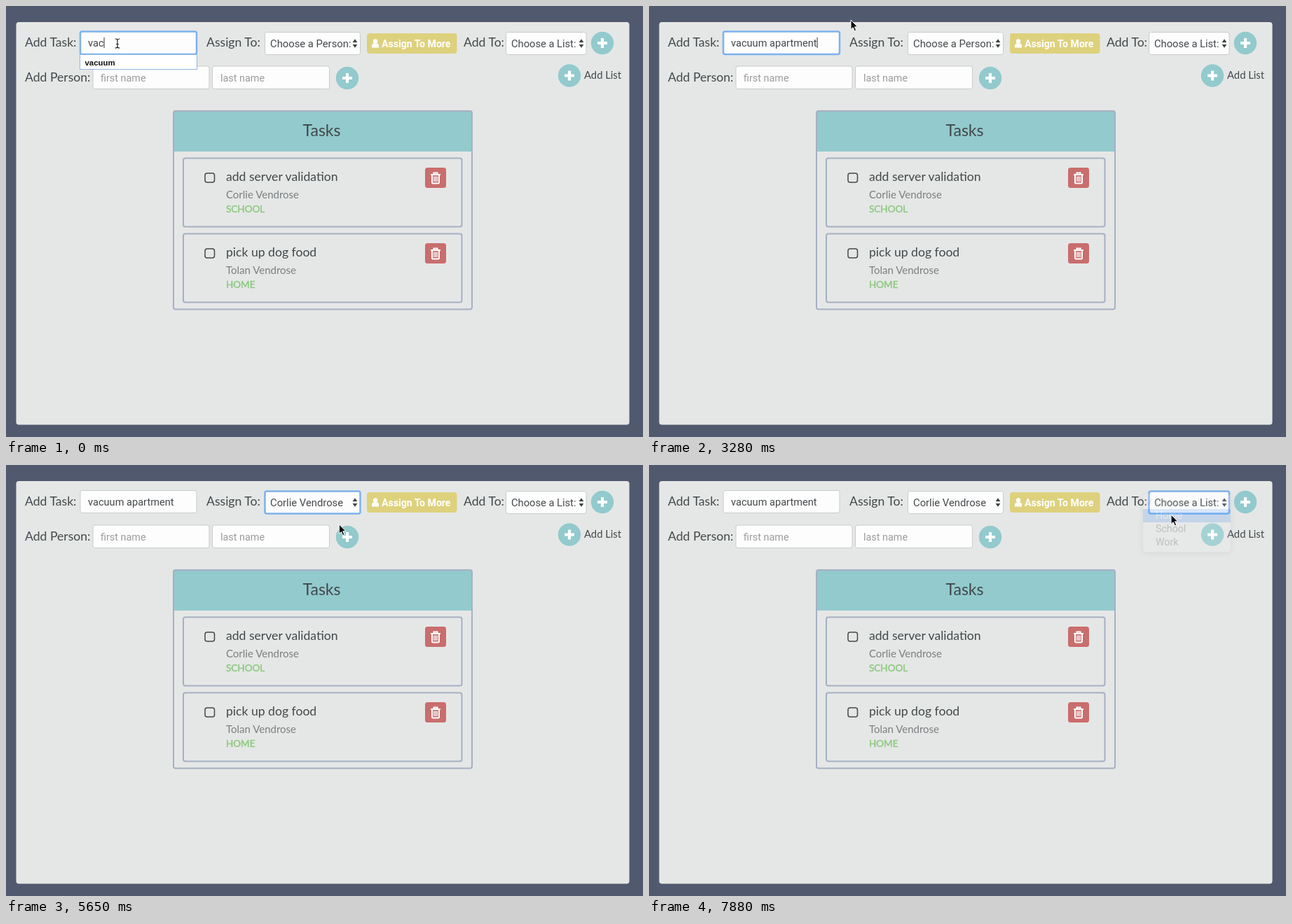
An HTML page for the animation above (8000 ms loop, 909 px wide and 616 px high).

```html
<!DOCTYPE html>
<html lang="en">
<head>
<meta charset="utf-8">
<title>Task board</title>
<style>
html, body { margin: 0; width: 100%; height: 100%; overflow: hidden; background: #51596f; }
svg { display: block; }
text { white-space: pre; font: 14.6px Roboto, sans-serif; fill: #45494c; }
.hand { font: 17.6px Lato, sans-serif; fill: #43484a; }
.hint { font-size: 14.4px; fill: #9a9c9d; }
.field { fill: #fdfdfd; stroke: #c8cbcc; }
.ring { fill: none; stroke: #7db2ee; stroke-width: 2.5; }
.frame { fill: none; stroke: #a6b0c3; stroke-width: 2; }
.person { font-size: 15px; fill: #7b7e80; }
.tag { font-size: 13.5px; fill: #8fc983; stroke: #8fc983; stroke-width: .5; }
.menu { filter: drop-shadow(0 2px 4px rgba(0, 0, 0, .32)); }
.menu text { font-size: 14.2px; fill: #26282a; }
.menu .off { fill: #707476; }
.menu .on { fill: #fff; }
</style>
</head>
<body>
<svg width="909" height="616" viewBox="0 0 909 616">
  <defs>
    <g id="plus">
      <circle r="16.2" fill="#92cacd"/>
      <path d="M-7 0H7M0-7V7" stroke="#fff" stroke-width="4.2"/>
    </g>
    <path id="arrows" d="M-3.4-1.4L0-6.2 3.4-1.4ZM-3.4 1.4L0 6.2 3.4 1.4Z" fill="#3c4043"/>
    <g id="trash">
      <rect width="30" height="29" rx="3.5" fill="#c96d6d"/>
      <path d="M8 10H22M12.5 9.500V7.500H17.500V9.500M10 11V21Q10 22.500 11.500 22.500H18.500Q20 22.500 20 21V11" fill="none" stroke="#fff" stroke-width="2"/>
      <path d="M12.800 12.500V20M15 12.500V20M17.200 12.500V20" stroke="#fff" stroke-width="1.3"/>
    </g>
    <path id="ibeam" d="M156 47Q159 47 159 49Q159 47 162 47M159 49V58M156 60Q159 60 159 58Q159 60 162 60M157.500 54.500H160.500" fill="none" stroke-linecap="round"/>
  </defs>

  <rect x="14.500" y="23" width="875" height="575.500" rx="4" fill="#e5e7e6"/>

  <text class="hand" x="27" y="58">Add Task:</text>
  <rect class="field" x="106" y="36.500" width="166" height="32" rx="3"/>
  <rect class="ring" id="taskRing" x="106" y="36.500" width="166" height="32.500" rx="2.500"/>
  <text id="task" x="117" y="58"></text>
  <path id="caret" d="M0 45V60" stroke="#333"/>

  <text class="hand" x="286" y="58">Assign To:</text>
  <rect class="field" x="369.500" y="37.500" width="136" height="32" rx="3"/>
  <rect class="ring" id="personRing" x="369.500" y="37.500" width="136" height="32" rx="2.500"/>
  <text id="person" x="377" y="59" style="font-size:14.8px"></text>
  <use href="#arrows" x="498" y="53.500"/>

  <rect x="515" y="39" width="128.500" height="29" rx="4" fill="#ded17d"/>
  <circle cx="527" cy="50.500" r="3.2" fill="#fff"/>
  <path d="M522 59.500V57Q522 53.500 525 53.500H529Q532 53.500 532 57V59.500Z" fill="#fff"/>
  <text x="536" y="58.500" style="font-weight:700;font-size:14.1px;fill:#fff">Assign To More</text>

  <text class="hand" x="653" y="58">Add To:</text>
  <rect class="field" x="713.500" y="37.500" width="114.500" height="32" rx="3"/>
  <rect class="ring" id="listRing" x="713.500" y="37.500" width="114.500" height="32" rx="2.500"/>
  <text x="721" y="59" style="font-size:14.7px">Choose a List:</text>
  <use href="#arrows" x="821" y="53.500"/>
  <use href="#plus" x="851" y="53"/>

  <text class="hand" x="27" y="107.500">Add Person:</text>
  <rect class="field" x="124" y="86" width="166" height="32.500" rx="3"/>
  <text class="hint" x="135" y="108">first name</text>
  <rect class="field" x="294.500" y="86" width="167" height="32.500" rx="3"/>
  <text class="hint" x="306" y="108">last name</text>
  <use href="#plus" x="487" y="103"/>
  <use href="#plus" x="804" y="99.500"/>
  <text class="hand" x="825" y="104" style="font-size:14.8px">Add List</text>

  <g id="suggestion">
    <rect x="105.500" y="69.500" width="167" height="21" fill="#fff" stroke="#93b8e0"/>
    <text x="112.500" y="85" style="font:700 11.4px 'Liberation Sans',sans-serif;fill:#111">vacuum</text>
  </g>

  <rect x="239" y="150" width="426" height="58" fill="#92cacd"/>
  <rect class="frame" x="239" y="150" width="426" height="283.500" rx="3"/>
  <text class="hand" x="450.500" y="185.500" text-anchor="middle" style="font-size:23px">Tasks</text>
  <g id="cards"></g>
  <g id="menus"></g>

  <g id="beam">
    <use href="#ibeam" stroke="#fff" stroke-width="2.6"/>
    <use href="#ibeam" stroke="#222" stroke-width="1.2"/>
  </g>
  <path id="pointer" d="M0 0V13.500L3.1 10.700 5.3 15.700 7.600 14.700 5.500 9.800H9.700Z" fill="#0a0a0a" stroke="#fff" stroke-linejoin="round"/>
</svg>
<script>
const $ = id => document.getElementById(id);
const show = (el, on) => { el.style.display = on ? '' : 'none'; };

const LOOP = 8000, STEP = 148.6, ROW = 19;
const TASK = 'vacuum apartment', CHOSEN = 'Corlie Vendrose', OTHER = 'Tolan Vendrose';

// [step, letters typed]
const TYPED = [[0, 3], [1, 4], [2, 5], [5, 6], [6, 7], [7, 8], [8, 9], [9, 10],
  [10, 11], [12, 12], [13, 13], [14, 14], [15, 16]];
// [step, x, y] of the pointer tip
const PATH = [[22, 288, 20], [27, 405, 51], [30, 405, 51], [34, 422, 91],
  [37, 422, 91], [43, 742, 54], [47, 742, 54], [50, 745, 71], [60, 745, 71]];

function card(y, title, person, tag) {
  return `<g transform="translate(0 ${y})">
    <rect class="frame" x="253" width="397.5" height="98" rx="3"/>
    <rect x="284" y="21.5" width="13.5" height="13" rx="3" fill="none" stroke="#43484a" stroke-width="1.5"/>
    <text class="hand" x="314" y="32">${title}</text>
    <text class="hand person" x="314" y="57">${person}</text>
    <text class="hand tag" x="314" y="77.5">${tag}</text>
    <use href="#trash" x="598" y="13.5"/></g>`;
}

function makeMenu(x, width, items) {
  const g = document.createElementNS('http://www.w3.org/2000/svg', 'g');
  g.setAttribute('class', 'menu');
  const height = items.length * ROW + 7.5;
  g.innerHTML = `<rect x="${x}" y="41" width="${width}" height="${height}" rx="5" fill="#eff2f2"/>
    <rect class="bar" x="${x}" width="${width}" height="${ROW}" fill="#4390f7"/>
    <path d="M${x + 6} 53.5L${x + 8} 56.5 ${x + 12} 48.5" fill="none" stroke="#8d9193" stroke-width="1.2"/>` +
    items.map((s, i) => `<text x="${x + 18}" y="${57.5 + i * ROW}">${s}</text>`).join('');
  $('menus').append(g);
  return g;
}

function drawMenu(menu, step, open, fade, tipY) {
  show(menu, step >= open && step <= fade);
  menu.style.opacity = step === fade ? 0.2 : 1;
  const row = Math.round((tipY - 52.5) / ROW);
  const bar = menu.querySelector('.bar');
  show(bar, row > 0);
  bar.setAttribute('y', 44 + row * ROW);
  menu.querySelectorAll('text').forEach((t, i) =>
    t.setAttribute('class', i === 0 ? 'off' : i === row ? 'on' : ''));
}

function tipAt(step) {
  const i = Math.max(1, PATH.findIndex(p => p[0] >= step));
  const [s0, x0, y0] = PATH[i - 1], [s1, x1, y1] = PATH[i];
  const k = Math.max(0, (step - s0) / (s1 - s0));
  return [x0 + (x1 - x0) * k, y0 + (y1 - y0) * k];
}

$('cards').innerHTML = card(217.5, 'add server validation', CHOSEN, 'SCHOOL') +
  card(325.5, 'pick up dog food', OTHER, 'HOME');
const people = makeMenu(360, 147, ['Choose a Person:', OTHER, CHOSEN, 'Oru Teskin', 'Norrie Plent']);
const lists = makeMenu(705, 125, ['Choose a List:', 'Home', 'School', 'Work']);

function draw(now) {
  const step = Math.floor(now % LOOP / STEP);
  const letters = TYPED.filter(t => t[0] <= step).pop()[1];
  const [x, y] = tipAt(step);

  $('task').textContent = TASK.slice(0, letters);
  $('caret').setAttribute('transform', `translate(${117.5 + $('task').getComputedTextLength()} 0)`);
  $('person').textContent = step < 38 ? 'Choose a Person:' : CHOSEN;
  $('pointer').setAttribute('transform', `translate(${x} ${y})`);

  show($('caret'), step < 19 || (step >= 22 && step < 26));
  show($('suggestion'), step < 5);
  show($('taskRing'), step < 28);
  show($('personRing'), step >= 28 && step < 45);
  show($('listRing'), step >= 45);
  show($('beam'), step < 22);
  show($('pointer'), step >= 22);
  drawMenu(people, step, 28, 37, y);
  drawMenu(lists, step, 45, 53, y);
  requestAnimationFrame(draw);
}
requestAnimationFrame(draw);
</script>
</body>
</html>
```
